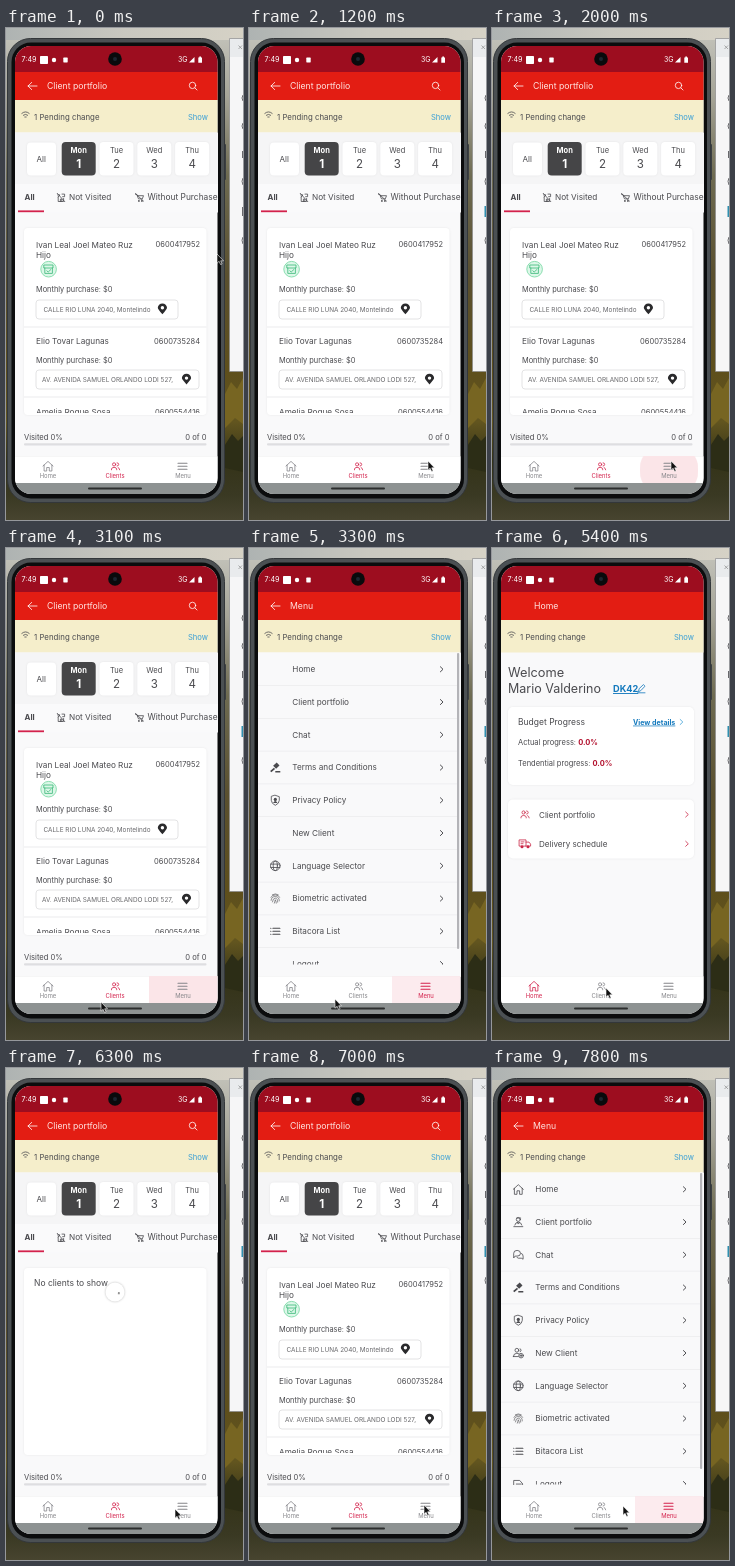
These frames come from a looping animation (237 by 492 pixels, 8 s). An HTML page:

```html
<!DOCTYPE html>
<html lang="en">
<head>
<meta charset="utf-8">
<title>Client portfolio</title>
<style>
html, body { margin: 0; width: 100%; height: 100%; overflow: hidden; background: #2e2d1e; }
svg { display: block; width: 100vw; height: 100vh; font: 8px Inter, sans-serif; fill: #4a4a4e; color: #4a4a4e; }
symbol, .ico { overflow: visible; }
.ico { fill: none; stroke: currentColor; stroke-width: .8; stroke-linecap: round; stroke-linejoin: round; }
.solid { fill: currentColor; stroke: none; }
.b { font-weight: 700; }
.mid { text-anchor: middle; }
.end { text-anchor: end; }
.white { fill: #fff; color: #fff; }
.blue { fill: #3a9fd6; color: #3a9fd6; }
.link { fill: #1379bd; color: #1379bd; font-weight: 700; text-decoration: underline; }
.red { fill: #b3122f; }
.small { font-size: 7.4px; }
.addr { font-size: 6.4px; fill: #68686b; }
.title { font-size: 8.7px; fill: #ffe4e1; }
.card { fill: #fff; filter: drop-shadow(0 .5px 1px #0001); }
.box { fill: #fff; stroke: #dcdcde; stroke-width: .8; }
.tab { color: #858589; fill: currentColor; font-size: 5.9px; text-anchor: middle; }

.anim, .page, .tab, .ripple, #cursor { animation: 8s infinite step-end; }
#clients { animation-name: clients; }
#menu { animation-name: menu; }
#home { animation-name: home; }
#list { animation-name: list; }
#empty { animation-name: empty; }
#late { animation-name: late; }
#picked { animation-name: picked; }
#tHome { animation-name: tHome; }
#tClients { animation-name: tClients; }
#tMenu { animation-name: tMenu; }
@keyframes clients { 0%, 72.5% { opacity: 1 } 40%, 93.75% { opacity: 0 } }
@keyframes menu { 0%, 55% { opacity: 0 } 40%, 93.75%, 100% { opacity: 1 } }
@keyframes home { 0%, 72.5% { opacity: 0 } 55% { opacity: 1 } }
@keyframes list { 0%, 83.75%, 100% { opacity: 1 } 72.5% { opacity: 0 } }
@keyframes empty { 0%, 83.75% { opacity: 0 } 72.5% { opacity: 1 } }
@keyframes late { 0% { opacity: 0 } 42.5%, 100% { opacity: 1 } }
@keyframes picked { 0% { opacity: 0 } 11.25%, 100% { opacity: 1 } }
@keyframes tHome { 55% { color: #d3224c } 72.5% { color: #858589 } }
@keyframes tClients { 0%, 72.5% { color: #d3224c } 40%, 93.75% { color: #858589 } }
@keyframes tMenu { 40%, 93.75%, 100% { color: #d3224c } 0%, 55% { color: #858589 } }

.ripple { fill: #fbe5e8; transform-box: fill-box; transform-origin: center; animation-timing-function: ease-out; }
#rMenu { animation-name: rMenu; }
#rHome { animation-name: rHome; }
#rClients { animation-name: rClients; }
@keyframes rMenu {
  0%, 23.6% { transform: scale(0); opacity: 1 }
  26%, 40% { transform: scale(1); opacity: 1 }
  41.25% { transform: scale(1); opacity: .75 }
  50%, 89.9% { transform: scale(1); opacity: 0 }
  90% { transform: scale(0); opacity: 1 }
  92.5%, 93.75% { transform: scale(1); opacity: 1 }
  97.5%, 100% { transform: scale(1); opacity: .75 }
}
@keyframes rHome {
  0%, 53% { transform: scale(0); opacity: 1 }
  55% { transform: scale(.85); opacity: 1 }
  56.25% { transform: scale(1); opacity: .8 }
  58.75%, 100% { transform: scale(1); opacity: 0 }
}
@keyframes rClients {
  0%, 71% { transform: scale(0); opacity: 1 }
  72.5% { transform: scale(.8); opacity: 1 }
  74% { transform: scale(1); opacity: .8 }
  76.5%, 100% { transform: scale(1); opacity: 0 }
}
#arc { fill: none; stroke: #222; stroke-width: 1.3; stroke-dasharray: 1 24.2; transform-origin: 109px 224px; animation: spin 8s infinite linear; }
@keyframes spin {
  0%, 72.5% { transform: rotate(-330deg); stroke-dasharray: 1 24.2 }
  75.75% { transform: rotate(-180deg); stroke-dasharray: 14 11.2 }
  78.75% { transform: rotate(5deg); stroke-dasharray: 1.6 23.6 }
  83.75%, 100% { transform: rotate(190deg); stroke-dasharray: 16 9.2 }
}
#cursor { animation-name: cursor; animation-timing-function: ease-in-out; }
@keyframes cursor {
  0%, 1.25% { transform: translate(211px, 226px) }
  13.75%, 28.75% { transform: translate(179px, 433px); animation-timing-function: linear }
  38.75% { transform: translate(95px, 454px); animation-timing-function: linear }
  41.25% { transform: translate(86px, 451px); animation-timing-function: ease-out }
  50%, 61.25% { transform: translate(47px, 441px) }
  67.5%, 72.5% { transform: translate(114px, 440px) }
  78.75% { transform: translate(169px, 441px) }
  81.25%, 92.5% { transform: translate(175px, 437px) }
  97.5%, 100% { transform: translate(131px, 438px) }
}
</style>
</head>
<body>
<svg viewBox="0 0 237 492">
<defs>
  <linearGradient id="sky"><stop stop-color="#aeb3b2"/><stop offset=".5" stop-color="#c9c8c0"/><stop offset="1" stop-color="#d6d2c6"/></linearGradient>
  <linearGradient id="wood" x2="0" y2="1">
    <stop stop-color="#c6c6be"/><stop offset=".14" stop-color="#a5a497"/><stop offset=".3" stop-color="#6e6b52"/>
    <stop offset=".5" stop-color="#5a5030"/><stop offset=".7" stop-color="#5e4f1c"/><stop offset=".8" stop-color="#62551f"/>
    <stop offset=".88" stop-color="#343318"/><stop offset=".95" stop-color="#3a3923"/><stop offset="1" stop-color="#47442f"/>
  </linearGradient>
  <clipPath id="screen"><rect x="9" y="18" width="202.5" height="448" rx="16"/></clipPath>
  <clipPath id="listClip"><path d="M18 200H201V385H18Z"/></clipPath>
  <clipPath id="menuClip"><path d="M9 104H212V416.5H9Z"/></clipPath>
  <clipPath id="navHome"><path d="M15 428.5H75V455H15Z"/></clipPath>
  <clipPath id="navClients"><path d="M76 428.5H143V455H76Z"/></clipPath>
  <clipPath id="navMenu"><path d="M143 428.5H212V455H143Z"/></clipPath>

  <symbol id="house"><path d="M-5 0 0-4.6 5 0M-3.9-1V5H-1.3V1.5H1.3V5H3.9V-1"/></symbol>
  <symbol id="people"><circle cx="-1.4" cy="-2" r="1.6"/><path d="M-4 3.4V2.6Q-3.8 1-1.4 1T1.2 2.6V3.4M1.6-3.6A1.6 1.6 0 0 1 1.6-.4M2.6 1.1Q4 1.6 4.2 3.4"/></symbol>
  <symbol id="bars"><path d="M-4.5-3H4.5M-4.5 0H4.5M-4.5 3H4.5"/></symbol>
  <symbol id="chev"><path d="M-1.3-2.5 1.3 0-1.3 2.5"/></symbol>
  <symbol id="back"><path d="M4.5 0H-4.5M-.8-3.6-4.5 0-.8 3.6"/></symbol>
  <symbol id="client"><circle cy="-2.6" r="2"/><path d="M-1.5-4H2.4M-3.5 3Q-3 .2 0 .2T3.5 3M-4.5 4.6H4.5M-1 .5 0 2 1 .5"/></symbol>
  <symbol id="chat"><path d="M-4.6 2.8V-1.5Q-4.6-4.4-1.2-4.4T2.2-1.5-1.2 1.3H-2.8ZM3-1.4Q4.8-1 4.8 1.4V4.4L3 3.4H0Q-1 3.3-1.2 2.6"/></symbol>
  <symbol id="gavel"><path class="solid" d="M-2.2-1.8 1.4-5 4.2-2 .8 1.2ZM-1.4.2-.2 1.4-4 4.6-5.2 3.4ZM0 3.4H5V4.9H0Z"/></symbol>
  <symbol id="shield"><path d="M0-5 4-3.6V0Q3.8 3.4 0 5-3.8 3.4-4 0V-3.6Z"/><circle class="solid" cy="-.9" r="1.6"/><path class="solid" d="M-2.2 2.6Q0-1 2.2 2.6Z"/></symbol>
  <symbol id="fresh"><circle cx="-1.4" cy="-2.8" r="1.9"/><path d="M-5 3.5Q-4.7.2-1.4.2L.6.8M-5 3.5H0M2-4.4Q4-3 2-1.2"/><circle cx="2.8" cy="2.6" r="2.3"/><path d="M1.6 2.6H4M2.8 1.4V3.8"/></symbol>
  <symbol id="globe"><circle r="4.8"/><ellipse rx="2.1" ry="4.8"/><path d="M-4.5-1.7H4.5M-4.5 1.7H4.5"/></symbol>
  <symbol id="finger"><path stroke-width=".6" d="M-3-3.8Q0-5.6 3-3.8M-4.4-1.2Q-3.4-3.6 0-3.6T4.4-1.2M-4.2 1.8Q-4-2 0-2T4 2.4M-2.9 3.4Q-2.4-.4 0-.4T2.4 3.6M-1 4.6Q-.4 2.6 0 1.2 1 3 1 4.6"/></symbol>
  <symbol id="rows"><path stroke-width="1.1" d="M-2.4-3H4.6M-2.4 0H4.6M-2.4 3H4.6M-4.6-3H-4.4M-4.6 0H-4.4M-4.6 3H-4.4"/></symbol>
  <symbol id="exit"><path d="M-4.6 4V-3.6H1.4L4.6 0 1.4 4ZM-2 0H3"/></symbol>
  <symbol id="truck"><path d="M-5.5-3.6H1V2.6H-5.5ZM1-1.4H4L5.6 .6V2.6H1M-4-1.6H-1M-4 .2H-2"/><circle class="solid" cx="-3" cy="3.3" r="1.5"/><circle class="solid" cx="3" cy="3.3" r="1.5"/></symbol>
  <symbol id="pin"><path class="solid" fill-rule="evenodd" d="M0 5.2Q-4.6.2-4.6-1.2A4.6 4.4 0 0 1 4.6-1.2Q4.6.2 0 5.2ZM0-2.9A1.7 1.7 0 1 0 0 .5 1.7 1.7 0 1 0 0-2.9Z"/></symbol>
  <symbol id="cart"><path d="M-4-3.2H-2.8L-1 1.4H2.8L4-1.8H-2.2M-4-4 4 3.6"/><circle class="solid" cx="-.6" cy="3.4" r=".9"/><circle class="solid" cx="2.4" cy="3.4" r=".9"/></symbol>
  <symbol id="shop"><path d="M-2.8-.6V4H2.6V1M-3.4-2.6H-1L-2.8-.6M1-3.4H3.6V-.8H1.6M-.6 4V1.6H.8V4M-3.8-4.2 3.8 4.2"/></symbol>
</defs>

<rect width="237" height="492" fill="url(#wood)"/>
<rect width="237" height="12" fill="url(#sky)"/>
<path fill="#776522" d="M219 366 225 354 231 361 237 350V396L229 390 219 400Z"/>
<path fill="#2c2d16" d="M217 420 226 406 232 413 237 408V444L219 440Z"/>

<g id="window">
  <path fill="#f6f6f7" d="M223.5 10.5H237V343.5H223.5Z"/>
  <path fill="#e9ebed" d="M223.5 10.5H237V29H223.5Z"/>
  <path fill="none" stroke="#8a8a8a" stroke-width=".7" d="M237 10.5H223.5V343.5H237M232.5 17.5 236 21M236 17.5 232.5 21"/>
  <path fill="none" stroke="#68686c" d="M237 67Q235 70 237 73M237 95Q235 98 237 101M236.5 123V130M237 150Q235 153 237 157M236.5 179V188M237 209Q235 212 237 216"/>
  <path id="picked" class="anim" fill="#2f8fb0" d="M235.5 178H237V189H235.5Z"/>
</g>

<rect x="217.5" y="116" width="2.5" height="36" rx="1" fill="#3b3f42"/>
<rect x="1.5" y="10.5" width="217" height="464" rx="23" fill="#4b5053" stroke="#33373a"/>
<rect x="5.5" y="14.5" width="209.5" height="456" rx="19.5" fill="#0b0c0d"/>

<g clip-path="url(#screen)">
  <path fill="#f9f9fa" d="M9 18H212V466H9Z"/>
  <path fill="#9d0d1f" d="M9 18H212V44H9Z"/>
  <path fill="#e31d13" d="M9 44H212V72H9Z"/>
  <path fill="#f5eecb" d="M9 72H212V104.5H9Z"/>
  <g class="white">
    <text x="15.5" y="34.3" font-size="7.2">7:49</text>
    <rect x="34" y="28" width="8" height="8" rx=".8"/>
    <circle cx="48" cy="32" r="2.2"/>
    <rect x="57.3" y="29.6" width="4.4" height="4.8" rx=".6"/>
    <text x="172" y="34.3" font-size="7">3G</text>
    <path d="M183 34.6H188.5V29Z"/><path d="M192.3 29.5H193.3V28.6H195V29.5H196V34.8H192.3Z"/>
  </g>
  <circle cx="109" cy="31" r="6.8" fill="#090a0c"/><circle cx="109" cy="31" r="2" fill="#1c2530"/>
  <g class="ico"><path d="M15.8 85.4Q19.5 82.2 23.2 85.4M17.3 87.2Q19.5 85.4 21.7 87.2M18.8 89H20.2"/></g>
  <text x="28" y="91.8" font-size="7.85">1 Pending change</text>
  <text x="202" y="91.8" class="blue end" font-size="7.6">Show</text>

  <g id="clients" class="page">
    <use href="#back" x="26.5" y="58" class="ico white" style="fill:none"/>
    <text x="41" y="61.2" class="title">Client portfolio</text>
    <g class="ico white" style="fill:none"><circle cx="186.5" cy="57.4" r="3.2"/><path d="M189 60 191 62"/></g>
    <path fill="#f5f5f6" d="M9 104.5H212V156H9Z"/>
    <g id="days"></g>
    <path fill="#fafafb" d="M9 156H212V184.5H9Z"/>
    <text x="18.5" y="172.4" class="b" font-size="7.9">All</text>
    <path fill="#d3224c" d="M12 182.4H38V184.2H12Z"/>
    <use href="#shop" x="55" y="169.5" class="ico"/>
    <text x="63" y="172.4" font-size="8.2">Not Visited</text>
    <use href="#cart" x="133.5" y="169.5" class="ico"/>
    <text x="141.5" y="172.4" font-size="8.4">Without Purchases</text>
    <rect x="18" y="200" width="182.5" height="187" rx="4" class="card"/>

    <g id="list" class="anim" clip-path="url(#listClip)">
      <text x="30" y="219.6" font-size="8.2">Ivan Leal Joel Mateo Ruz</text>
      <text x="30" y="230.4" font-size="8.2">Hijo</text>
      <text x="194" y="219.4" class="end" font-size="7.5">0600417952</text>
      <circle cx="42.6" cy="241.2" r="7.8" fill="#dcf7e8" stroke="#7fdba9" stroke-width=".9"/>
      <g class="ico" color="#38b877"><path d="M38.8 240V245.4H46.4V240M38.2 237H47V240H38.2ZM40.8 242.8 42.2 244 44.8 241.6"/></g>
      <text x="30" y="264" class="small">Monthly purchase: $0</text>
      <rect x="30" y="272" width="142" height="19" rx="3" class="box"/>
      <text x="37.5" y="283.8" class="addr">CALLE RIO LUNA 2040, Montelindo</text>
      <use href="#pin" x="156.4" y="281" class="ico" color="#2a2a2c"/>
      <path fill="#ececee" d="M18 298.5H200.5V299.5H18Z"/>
      <text x="30" y="316.3" font-size="8.2">Elio Tovar Lagunas</text>
      <text x="194" y="316.2" class="end" font-size="7.5">0600735284</text>
      <text x="30" y="335" class="small">Monthly purchase: $0</text>
      <rect x="30" y="342" width="163" height="19" rx="3" class="box"/>
      <text x="36" y="353.8" class="addr">AV. AVENIDA SAMUEL ORLANDO LODI 527,</text>
      <use href="#pin" x="180.5" y="351.3" class="ico" color="#2a2a2c"/>
      <path fill="#ececee" d="M18 368.5H200.5V369.5H18Z"/>
      <text x="30" y="387.3" font-size="8.2">Amelia Roque Sosa</text>
      <text x="194" y="387.2" class="end" font-size="7.5">0600554416</text>
    </g>

    <g id="empty" class="anim">
      <text x="28" y="218" font-size="8.5">No clients to show.</text>
      <circle cx="109" cy="224" r="9.5" fill="#fff" style="filter:drop-shadow(0 .8px 1.2px #0004)"/>
      <circle id="arc" cx="109" cy="224" r="4"/>
    </g>

    <text x="18" y="411.8" font-size="7.6">Visited 0%</text>
    <text x="200.5" y="411.8" class="end" font-size="7.6">0 of 0</text>
    <rect x="18" y="415.3" width="182.5" height="2.2" rx="1" fill="#dedee1"/>
  </g>

  <g id="menu" class="page">
    <path fill="#f9f9fa" d="M9 104.5H212V429H9Z"/>
    <use href="#back" x="26.5" y="58" class="ico white" style="fill:none"/>
    <text x="41" y="61.2" class="title">Menu</text>
    <g clip-path="url(#menuClip)"><g id="rowList"></g><g id="late" class="anim"></g></g>
    <rect x="208" y="105" width="2.2" height="296" rx="1" fill="#b4b4b8"/>
  </g>

  <g id="home" class="page">
    <text x="42" y="61.2" class="title">Home</text>
    <text x="16" y="128.6" font-size="12.8">Welcome</text>
    <text x="16" y="145" font-size="12.5">Mario Valderino</text>
    <text x="121" y="144" class="link" font-size="9.2">DK42</text>
    <g class="ico link"><path fill="none" d="M146.5 143.4 147.2 140.6 151.4 136.6 153 138.2 149 142.4ZM145.5 144.8H153"/></g>
    <rect x="16" y="159" width="186" height="78" rx="5" class="card"/>
    <text x="26" y="177" font-size="8.5">Budget Progress</text>
    <text x="141" y="176.6" class="link" font-size="7.1">View details</text>
    <use href="#chev" x="189.5" y="174" class="ico blue" style="fill:none"/>
    <text x="26" y="196.5" font-size="7.5">Actual progress: <tspan class="b red">0.0%</tspan></text>
    <text x="26" y="217.8" font-size="7.5">Tendential progress: <tspan class="b red">0.0%</tspan></text>
    <rect x="16" y="251.5" width="186" height="59" rx="5" class="card"/>
    <g class="ico" color="#c92747">
      <use href="#people" x="33" y="266.5"/><use href="#truck" x="33" y="295.5"/>
      <use href="#chev" x="195" y="266.5"/><use href="#chev" x="195" y="295.8"/>
    </g>
    <text x="47" y="269.5" font-size="8.1">Client portfolio</text>
    <text x="47" y="298.7" font-size="8.1">Delivery schedule</text>
  </g>

  <path fill="#fff" d="M9 428.5H212V455H9Z"/>
  <path fill="#efeff0" d="M9 428H212V428.6H9Z"/>
  <g clip-path="url(#navHome)"><circle id="rHome" class="ripple" cx="42" cy="442" r="34"/></g>
  <g clip-path="url(#navClients)"><circle id="rClients" class="ripple" cx="109" cy="442" r="37"/></g>
  <g clip-path="url(#navMenu)"><circle id="rMenu" class="ripple" cx="177" cy="442" r="38"/></g>
  <g id="tHome" class="tab"><use href="#house" x="42" y="438" class="ico"/><text x="42" y="449.6">Home</text></g>
  <g id="tClients" class="tab"><use href="#people" x="109.5" y="438.4" class="ico"/><text x="109" y="449.6">Clients</text></g>
  <g id="tMenu" class="tab"><use href="#bars" x="176.5" y="438.3" class="ico" style="stroke-width:1.1"/><text x="177" y="449.6">Menu</text></g>
  <path fill="#8d9292" d="M9 455H212V466H9Z"/>
  <rect x="82" y="459.5" width="54" height="2" rx="1" fill="#2c2e2e"/>
</g>

<g id="cursor"><path fill="#111" stroke="#fff" stroke-width=".6" stroke-linejoin="round" d="M0 0V9.2L2.1 7.3 3.6 10.6 5.1 9.9 3.7 6.8H6.5Z"/></g>
</svg>
<script>
const put = (id, html) => document.getElementById(id).insertAdjacentHTML("beforeend", html);

put("days", '<rect x="21" y="114.5" width="29" height="33" rx="4" class="card"/><text x="35.3" y="134" class="mid">All</text>');
["Mon", "Tue", "Wed", "Thu"].forEach((day, i) => {
  const x = 72.7 + i * 37.8, kind = i ? "mid" : "mid b white";
  put("days", `<rect x="${x - 17}" y="114" width="34" height="33.5" rx="4" ${i ? 'class="card"' : 'fill="#454547"'}/>
    <text x="${x}" y="124.8" class="${kind}" font-size="7.5">${day}</text>
    <text x="${x}" y="140" class="${kind}" font-size="11.5">${i + 1}</text>`);
});

const items = [
  ["Home", "house", 1], ["Client portfolio", "client", 1], ["Chat", "chat", 1],
  ["Terms and Conditions", "gavel"], ["Privacy Policy", "shield"], ["New Client", "fresh", 1],
  ["Language Selector", "globe"], ["Biometric activated", "finger"], ["Bitacora List", "rows"], ["Logout", "exit", 1]
];
items.forEach(([label, icon, late], i) => {
  const y = 121.3 + i * 32.75;
  put("rowList", `<text x="43.3" y="${y + 2.7}" font-size="8.2">${label}</text>
    <use href="#chev" x="192.7" y="${y}" class="ico" style="stroke-width:1"/>
    <path fill="#ebebed" d="M9 ${y + 16}h199v.8h-199z"/>`);
  put(late ? "late" : "rowList", `<use href="#${icon}" x="26.3" y="${y}" class="ico"/>`);
});
</script>
</body>
</html>
```
